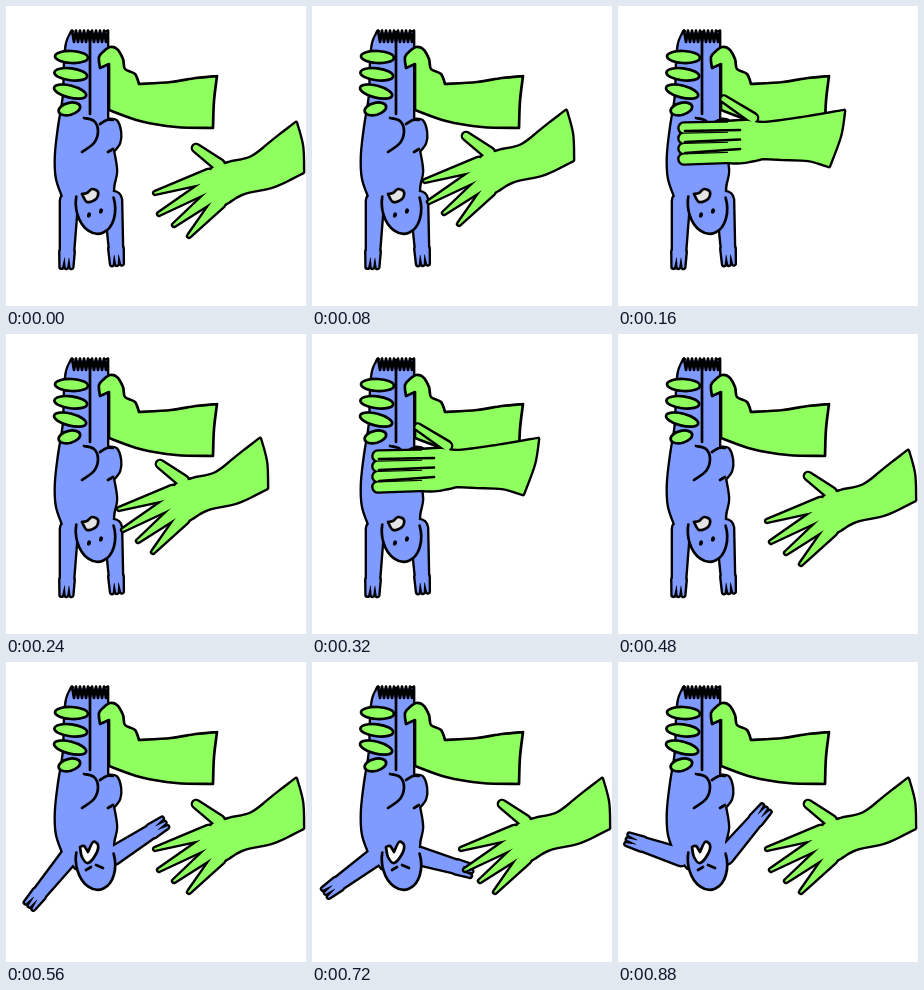
Animation, 300 px wide and 300 px high, one loop 920 ms. Source, as an HTML page with a canvas:

```html
<!DOCTYPE html>
<html lang="en">
<head>
<meta charset="utf-8">
<title>Flapping puppet</title>
<style>
  html, body { margin: 0; width: 100%; height: 100%; overflow: hidden; background: #fff; }
  canvas { display: block; width: 300px; height: 300px; }
</style>
</head>
<body>
<canvas id="stage" width="300" height="300"></canvas>
<script>
const ctx = document.getElementById('stage').getContext('2d');
const BLUE = '#809bff', GREEN = '#8fff60', INK = '#000';
const LINE = 2.7, LOOP = 920, STEP = 80;
const range = n => [...Array(n).keys()];

// Smooth curve through key points; "|" marks a sharp corner.
function curve(text) {
  const path = new Path2D();
  let last = null;
  for (const part of text.split('|')) {
    const pts = part.trim().split(/\s+/).map(p => p.split(',').map(Number));
    if (last) pts.unshift(last);
    else path.moveTo(...pts[0]);
    for (let i = 0; i < pts.length - 1; i++) {
      const a = pts[i], b = pts[i + 1];
      const before = pts[i - 1] || a, after = pts[i + 2] || b;
      path.bezierCurveTo(
        a[0] + (b[0] - before[0]) / 6, a[1] + (b[1] - before[1]) / 6,
        b[0] - (after[0] - a[0]) / 6, b[1] - (after[1] - a[1]) / 6,
        ...b);
    }
    last = pts[pts.length - 1];
  }
  return path;
}

// Rounded limb from a to b that narrows from radius ra to rb.
function limb([ax, ay], [bx, by], ra, rb) {
  const path = new Path2D();
  const angle = Math.atan2(by - ay, bx - ax), side = Math.PI / 2;
  path.arc(bx, by, rb, angle - side, angle + side);
  path.arc(ax, ay, ra, angle + side, angle - side);
  path.closePath();
  return path;
}

function line(x1, y1, x2, y2) {
  ctx.beginPath();
  ctx.moveTo(x1, y1);
  ctx.lineTo(x2, y2);
  ctx.stroke();
}

function shape(path, color) {
  ctx.fillStyle = color;
  ctx.fill(path);
  ctx.stroke(path);
}

// Several parts merged into one silhouette with a common outline.
function merged(parts, color) {
  ctx.lineWidth = LINE * 1.75;
  parts.forEach(part => ctx.stroke(part));
  ctx.lineWidth = LINE;
  ctx.fillStyle = color;
  parts.forEach(part => ctx.fill(part));
}

function dot(x, y) {
  ctx.fillStyle = INK;
  ctx.beginPath();
  ctx.ellipse(x, y, 2, 2.7, 0.3, 0, Math.PI * 2);
  ctx.fill();
}

const torso = curve('66,26 61,38 59,60 58,90 53,122 50,150 51,172 57,190 | 70,206 | 107,206 | 107,182 110,165 107,145 | 113,137 114,126 110,115 101,114 | 101,26');
const chest = ['78,112 88,115 92,125 88,137 76,146', '94,118 101,114 107,114', '107,143 102,146'].map(curve);
const calmMouth = curve('76,188 81,187 86,183 92,186 90,193 81,196 76,188');
const heartMouth = curve('74,185 78,184 82,190 | 87,180 92,183 90,192 82,201 76,195 74,185');

const SHOULDERS = [[63, 195], [107, 194]];
const POSES = {
  down: [[61, 246], [110, 243]],
  low: [[33, 232], [146, 169]],
  high: [[24, 182], [138, 158]],
  wide: [[26, 222], [145, 205]]
};

function arm(shoulder, hand) {
  const angle = Math.atan2(hand[1] - shoulder[1], hand[0] - shoulder[0]);
  const cos = Math.cos(angle), sin = Math.sin(angle);
  const at = (along, across) => [hand[0] + along * cos - across * sin, hand[1] + along * sin + across * cos];
  const fingers = [-1, 0, 1].map(k => limb(at(0, 4 * k), at(15, 5 * k), 2.6, 0.8));
  return [limb(shoulder, hand, 8, 6), ...fingers];
}

function drawToes() {
  ctx.beginPath();
  for (const k of range(19)) ctx.lineTo(66 + 2 * k, k % 2 ? 36 : 24.5);
  ctx.stroke();
  line(84, 26, 84, 108);
}

function drawFace(calm) {
  ctx.beginPath();
  ctx.ellipse(89.5, 200, 19.5, 28, -0.15, -0.2, Math.PI + 0.45);
  ctx.fillStyle = BLUE;
  ctx.fill();
  ctx.stroke();
  if (calm) {
    shape(calmMouth, '#e4e4e4');
    dot(83, 209);
    dot(95, 205);
  } else {
    shape(heartMouth, '#fff');
    line(80, 208, 85, 205);
    line(90, 203, 97, 206);
  }
}

function drawPuppet(pose) {
  const arms = POSES[pose].flatMap((hand, i) => arm(SHOULDERS[i], hand));
  merged([torso, ...arms], BLUE);
  chest.forEach(part => ctx.stroke(part));
  drawToes();
  drawFace(pose === 'down');
}

const gripArm = curve('94,62 93,51 98,45 104,41 111,43 117,53 119,63 129,68 133,78 | 165,76 190,72 211,70 | 208,95 207,122 | 170,121 134,115 103,104 | 103,58 | 94,62');

function drawGrip() {
  shape(gripArm, GREEN);
  [0.05, 0.12, 0.25, -0.25].forEach((tilt, i) => {
    const finger = new Path2D();
    finger.ellipse(65.5 - i * 0.7, 51 + 17.3 * i, tilt < 0 ? 11 : 16.5, 6, tilt, 0, Math.PI * 2);
    shape(finger, GREEN);
  });
}

const openHand = [
  curve('203,170 207,162 223,157 246,151 268,134 290,117 | 296,140 297,166 | 268,180 238,187 222,196 | 208,204'),
  limb([213, 159], [190, 142], 5, 3),
  limb([203, 170], [149, 187], 6, 0.8),
  ...range(3).map(i => limb([205 + 4 * i, 178 + 9 * i], [153 + 15 * i, 208 + 11 * i], 6, 0.8))
];

const flatHand = [
  curve('110,116 130,115 147,117 185,112 226,105 | 222,130 211,160 | 190,154 165,153 145,152 | 125,156 110,156'),
  limb([135, 112], [106, 93], 4, 2.5),
  ...range(4).map(i => limb([122, 121 + 10 * i], [66, 122 + 10.3 * i], 4.5, 4.5))
];

function drawHand(state) {
  if (state === 'flat') {
    merged(flatHand, GREEN);
    for (const i of range(3)) line(67, 125 + 11 * i, 122, 124 + 9.5 * i);
    return;
  }
  ctx.save();
  if (state === 'near') ctx.translate(-36, -12);
  merged(openHand, GREEN);
  ctx.restore();
}

const slaps = ['away', 'near', 'flat', 'near', 'flat', 'near', 'away'];
const flaps = ['low', 'high', 'wide'];

function render(now) {
  const step = Math.floor((now % LOOP) / STEP);
  const flap = step - slaps.length;
  ctx.clearRect(0, 0, 300, 300);
  ctx.strokeStyle = INK;
  ctx.lineWidth = LINE;
  ctx.lineCap = ctx.lineJoin = 'round';
  drawPuppet(flap < 0 ? 'down' : flaps[flap % flaps.length]);
  drawGrip();
  drawHand(slaps[step] || 'away');
}

const start = performance.now();
function tick() {
  render(performance.now() - start);
  requestAnimationFrame(tick);
}
tick();
</script>
</body>
</html>
```
